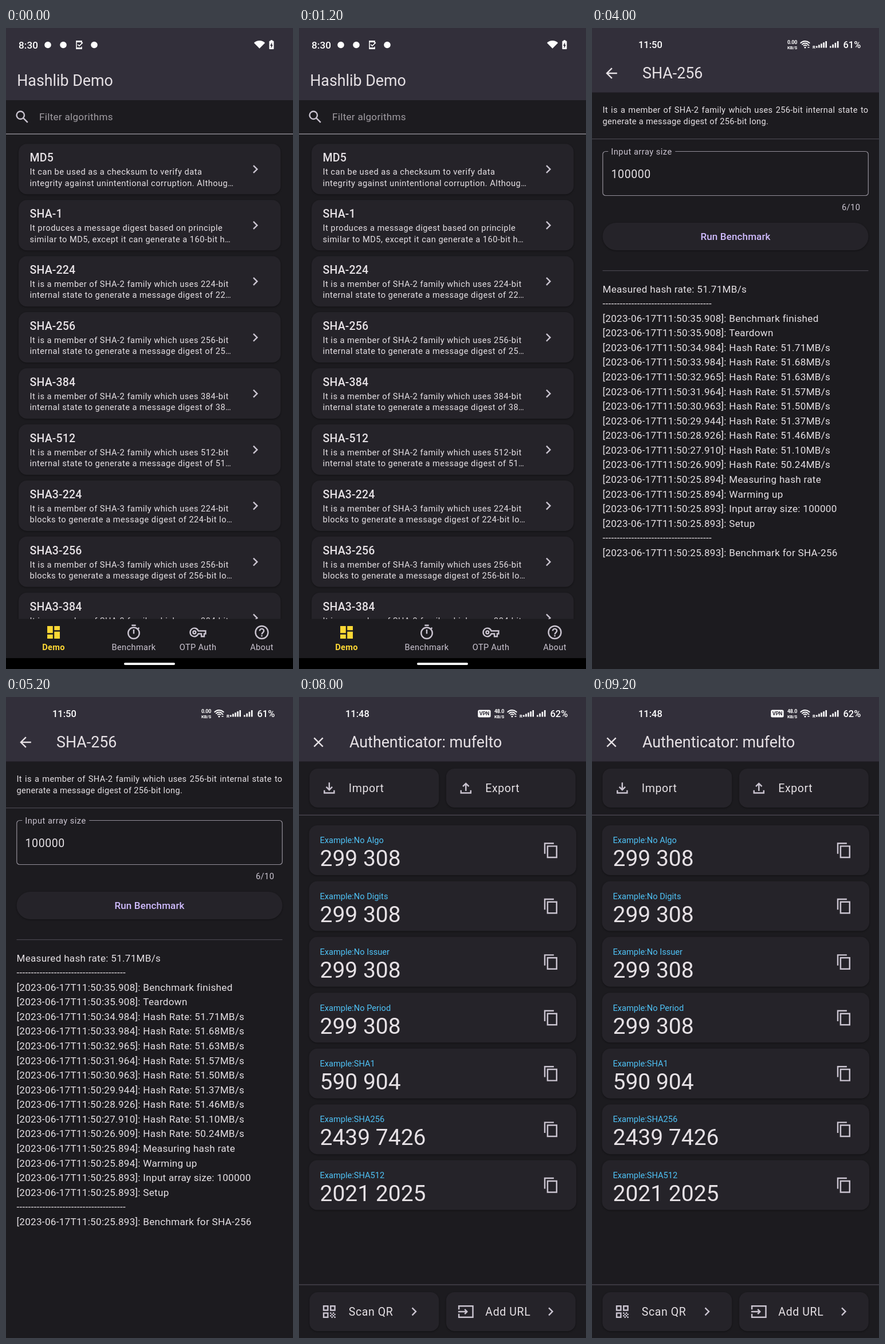
These frames come from a looping animation (501x1119 px, 10000 ms). An HTML page with a canvas:

```html
<!DOCTYPE html>
<html lang="en">
<head>
<meta charset="utf-8">
<title>Hashlib Demo</title>
<style>
html, body { margin: 0; width: 100%; height: 100%; overflow: hidden; background: #1c1b1f; }
canvas { display: block; width: 501px; height: 1119px; }
</style>
</head>
<body>
<canvas id="stage"></canvas>
<script>
const W = 501, H = 1119, DP = 1.219, SCENE_MS = 2000;
const canvas = document.getElementById('stage');
const ctx = canvas.getContext('2d');
const ratio = window.devicePixelRatio || 1;
canvas.width = W * ratio;
canvas.height = H * ratio;

const BG = '#1c1b1f', BAR = '#322f3a', CARD = '#252329', DIALOG = '#302d38';
const TEXT = '#e6e1e5', SOFT = '#cac4d0', OUTLINE = '#938f99', LINE = '#49454f';
const LILAC = '#d0bcff', CYAN = '#18ffff', YELLOW = '#fdd835', BLUE = '#4fc3f7', WHITE = '#fff';
const KEY_TEXT = '#f1e9e5';

// size in dp, letter spacing in dp, weight, family
const STYLES = {
  title: [22, 0, 400],
  dialog: [24, 0, 400],
  heading: [16, .15, 500],
  input: [16, .5, 400],
  choice: [16, 0, 400],
  body: [14, .25, 400],
  button: [14, .1, 500],
  small: [12, .4, 400],
  note: [12, .25, 400],
  tab: [12, .3, 400],
  tabOn: [12, .25, 700],
  plain: [12, 0, 400],
  code: [32, 0, 400],
  key: [28, 0, 400, 'Inter'],
  clock: [14, .1, 500],
  clockSmall: [13.5, 0, 500],
  tiny: [7.4, -.2, 700],
  tinier: [6.4, -.1, 700]
};

const FILLED = {
  chevron: 'M10 6L8.6 7.4 13.2 12l-4.6 4.6L10 18l6-6z',
  dashboard: 'M3 13h8V3H3zM3 21h8v-6H3zM13 21h8V11h-8zM13 3v6h8V3z',
  drop: 'M7 10l5 5 5-5z',
  wifi: 'M12 4C7.3 4 3.1 5.9 0 9l12 12L24 9C20.9 5.9 16.7 4 12 4z',
  battery: 'M15.7 4H14V2h-4v2H8.3Q7 4 7 5.3v15.4Q7 22 8.3 22h7.4q1.3 0 1.3-1.3V5.3Q17 4 15.7 4zM11 20v-5.5H9L13 7v5.5h2z',
  eye: 'M12 4.5C7 4.5 2.7 7.6 1 12c1.7 4.4 6 7.5 11 7.5s9.3-3.1 11-7.5c-1.7-4.4-6-7.5-11-7.5zM12 17a5 5 0 1 1 0-10a5 5 0 1 1 0 10zM12 9a3 3 0 1 0 0 6a3 3 0 1 0 0-6z'
};
const STROKED = {
  search: 'M15 9.5a5.5 5.5 0 1 1-11 0a5.5 5.5 0 1 1 11 0M13.5 13.5l6.3 6.3',
  timer: 'M9 2h6M12 8v6M17.7 7.3l2-2M20 13a8 8 0 1 1-16 0a8 8 0 1 1 16 0',
  vpnKey: 'M12.6 10H23v4h-2v4h-4v-4h-4.4a6 6 0 1 1 0-4zM9 12a2 2 0 1 1-4 0a2 2 0 1 1 4 0',
  help: 'M21 12a9 9 0 1 1-18 0a9 9 0 1 1 18 0M12 16v2M9 10a3 3 0 1 1 6 0c0 2.2-3 2.2-3 5',
  info: 'M21 12a9 9 0 1 1-18 0a9 9 0 1 1 18 0M12 7v2M12 11v6',
  back: 'M20 12H5.8M12.7 4.7L5.4 12l7.3 7.3',
  close: 'M5.7 5.7l12.6 12.6M18.3 5.7L5.7 18.3',
  copy: 'M3 17V2h13M7 6h13v16H7z',
  import: 'M5 15v4h14v-4M12 4v10M7.7 10.3L12 14.6l4.3-4.3',
  export: 'M5 15v4h14v-4M12 16V6M7.7 9.7L12 5.4l4.3 4.3',
  addUrl: 'M2 9V4h20v16H2v-5M1 12h12M10.3 8.7l3.3 3.3-3.3 3.3',
  login: 'M2 12h12M10.3 7.7l4.3 4.3-4.3 4.3M12 4h9v16h-9',
  scan: 'M4 4h6v6H4zM14 4h6v6h-6zM4 14h6v6H4zM13 14h2M17 14h2M15 16h2M19 16h2M13 18h2M17 18h2M15 20h2M19 20h2',
  backspace: 'M7 4h16v16H7L1.3 12zM10 8l8 8M18 8l-8 8',
  check: 'M4.1 12.7L9 17.6 20.3 6.3',
  down: 'M6 9l6 6 6-6',
  phoneCheck: 'M18 8V3H6v18h12v-5M6 5h12M6 19h12M9 11l3.5 3.5 8-8'
};
const paths = {};
for (const [name, d] of Object.entries({ ...FILLED, ...STROKED })) paths[name] = new Path2D(d);

function useStyle(style) {
  const [size, spacing, weight, family = 'Roboto'] = STYLES[style];
  ctx.font = `${weight} ${size * DP}px ${family}, sans-serif`;
  ctx.letterSpacing = `${spacing * DP}px`;
  return size * DP;
}

// y is the middle of the capitals
function text(str, x, y, style, color = TEXT, align = 'left') {
  const size = useStyle(style);
  ctx.textAlign = align;
  ctx.fillStyle = color;
  ctx.fillText(str, x, y + size * .3555);
}

function justified(lines, x, y, width, pitch) {
  lines.forEach((line, i) => {
    useStyle('note');
    if (i < lines.length - 1) {
      const gaps = line.split(' ').length - 1;
      ctx.wordSpacing = `${(width - ctx.measureText(line).width) / gaps}px`;
    }
    text(line, x, y + i * pitch, 'note');
    ctx.wordSpacing = '0px';
  });
}

function rect(x, y, w, h, color) {
  ctx.fillStyle = color;
  ctx.fillRect(x, y, w, h);
}

function round(x, y, w, h, r, color) {
  ctx.beginPath();
  ctx.roundRect(x, y, w, h, r);
  ctx.fillStyle = color;
  ctx.fill();
}

function dot(x, y, r, color = WHITE) {
  ctx.beginPath();
  ctx.arc(x, y, r, 0, Math.PI * 2);
  ctx.fillStyle = color;
  ctx.fill();
}

function card(x, y, w, h, r = 14.6) {
  ctx.save();
  ctx.shadowColor = 'rgba(0,0,0,.4)';
  ctx.shadowBlur = 3 * ratio;
  ctx.shadowOffsetY = ratio;
  round(x, y, w, h, r, CARD);
  ctx.restore();
}

function icon(name, x, y, color = SOFT, size = 29.3) {
  ctx.save();
  ctx.translate(x - size / 2, y - size / 2);
  ctx.scale(size / 24, size / 24);
  ctx.fillStyle = ctx.strokeStyle = color;
  ctx.lineWidth = 2;
  if (FILLED[name]) ctx.fill(paths[name], 'evenodd');
  else ctx.stroke(paths[name]);
  ctx.restore();
}

function field(x, y, w, h, label, active, bg = BG) {
  ctx.beginPath();
  ctx.roundRect(x, y, w, h, 5);
  ctx.strokeStyle = active ? LILAC : OUTLINE;
  ctx.lineWidth = active ? 2.44 : 1.22;
  ctx.stroke();
  useStyle('small');
  rect(x + 9.5, y - 3, ctx.measureText(label).width + 10.5, 6, bg);
  text(label, x + 14.5, y, 'small', active ? LILAC : SOFT);
}

function appBar(height, title, x, y, lead) {
  rect(0, 0, W, height, BAR);
  if (lead) icon(lead, 34, y + .5, TEXT);
  text(title, x, y, 'title');
}

function homePill(x, y, w, h) {
  round(x, y, w, h, h / 2, WHITE);
}

function systemNav() {
  rect(0, 1100, W, 19, '#000');
  homePill(206, 1108, 89, 4);
}

function power(y) {
  icon('wifi', 442.5, y - .5, WHITE, 19.2);
  icon('battery', 463.5, y, WHITE, 19.2);
}

function bars(x, count, step) {
  for (let i = 0; i < count; i++) {
    const h = 3 + i * 8.5 / (count - 1);
    rect(x + i * step, 34.5 - h, 2.6, h, WHITE);
  }
}

function carrierStatus(time, rate, level) {
  text(time, 81, 29.5, 'clockSmall', WHITE);
  text(rate, 349.5, 25, 'tiny', WHITE, 'center');
  text('KB/S', 349.5, 34, 'tinier', WHITE, 'center');
  ctx.strokeStyle = WHITE;
  ctx.lineWidth = 1.8;
  for (const r of [4, 7.5, 11]) {
    ctx.beginPath();
    ctx.arc(372, 34, r, -Math.PI * .77, -Math.PI * .23);
    ctx.stroke();
  }
  dot(372, 34, 1.5);
  rect(376.5, 29.5, 3, 1.5, WHITE);
  rect(376.5, 33, 3, 1.5, WHITE);
  text('R', 385, 33, 'tinier', WHITE);
  bars(391, 5, 4.1);
  bars(415, 4, 4.3);
  text(level, 438.5, 29.5, 'clockSmall', WHITE);
}

function gear(x, y) {
  ctx.strokeStyle = WHITE;
  ctx.lineWidth = 3.6;
  ctx.beginPath();
  ctx.arc(x, y, 4.6, 0, Math.PI * 2);
  for (let i = 0; i < 6; i++) {
    const a = i * Math.PI / 3 + Math.PI / 6;
    ctx.moveTo(x + 5 * Math.cos(a), y + 5 * Math.sin(a));
    ctx.lineTo(x + 7.8 * Math.cos(a), y + 7.8 * Math.sin(a));
  }
  ctx.stroke();
}

const sha2 = n => ['SHA-' + n, `It is a member of SHA-2 family which uses ${n}-bit`,
  `internal state to generate a message digest of ${String(n).slice(0, 2)}…`];
const sha3 = n => ['SHA3-' + n, `It is a member of SHA-3 family which uses ${n}-bit`,
  `blocks to generate a message digest of ${n}-bit lo…`];
const ALGORITHMS = [
  ['MD5', 'It can be used as a checksum to verify data', 'integrity against unintentional corruption. Althoug…'],
  ['SHA-1', 'It produces a message digest based on principle', 'similar to MD5, except it can generate a 160-bit h…'],
  ...[224, 256, 384, 512].map(sha2),
  ...[224, 256, 384].map(sha3)
];

function listScene() {
  appBar(126, 'Hashlib Demo', 19.2, 91.5);
  text('8:30', 22, 29.5, 'clock', WHITE);
  for (const x of [73, 100, 154]) dot(x, 29.5, 5.8);
  icon('phoneCheck', 127.5, 29.5, WHITE, 18);
  power(29);

  icon('search', 28.3, 155.3, SOFT);
  text('Filter algorithms', 58, 155, 'body', '#a19da3');
  rect(0, 184.3, W, 1.4, OUTLINE);

  ctx.save();
  ctx.beginPath();
  ctx.rect(0, 186, W, 845.7);
  ctx.clip();
  ALGORITHMS.forEach(([name, first, second], i) => {
    const y = 202.3 + i * 97.93;
    card(22, y, 457.5, 88);
    text(name, 41.5, y + 24, 'heading');
    text(first, 41.5, y + 48.6, 'small');
    text(second, 41.5, y + 68.1, 'small');
    icon('chevron', 435.2, y + 44.2);
  });
  ctx.restore();

  const tabs = [['dashboard', 'Demo', 83], ['timer', 'Benchmark', 223],
    ['vpnKey', 'OTP Auth', 335], ['help', 'About', 446.5]];
  tabs.forEach(([name, label, x], i) => {
    const color = i ? SOFT : YELLOW;
    icon(name, x, 1055, color);
    text(label, x, 1080.5, i ? 'tab' : 'tabOn', color, 'center');
  });
  systemNav();
}

function digestScene() {
  appBar(126, 'MD5', 87.5, 91.5, 'back');
  text('8:30', 22, 29.5, 'clock', WHITE);
  for (const x of [73, 100]) dot(x, 29.5, 5.8);
  rect(120, 22, 15, 14.5, WHITE);
  icon('phoneCheck', 154.5, 29.5, WHITE, 18);
  dot(181, 29.5, 2.2);
  power(29);

  justified([
    'It can be used as a checksum to verify data integrity against',
    'unintentional corruption. Although it was widely used as a',
    'cryptographic hash function once, it has been found to suffer from',
    'extensive vulnerabilities.'
  ], 18, 156.3, 466, 20.7);
  rect(0, 248.4, W, 1.2, LINE);

  field(18, 271, 466, 77.5, 'Input format');
  text('UTF-8', 32.5, 309, 'choice', CYAN);
  icon('drop', 455, 308.5);
  field(18, 362, 466, 106.3, 'Input text');
  text('Hashlib', 32.5, 401.5, 'input');
  text('7/1000', 469.5, 488.5, 'small', SOFT, 'right');
  rect(18, 516, 466, 1.2, LINE);

  field(18, 536.5, 466, 75.5, 'Output format', true);
  text('Base-16 / Hexadecimal', 32.5, 573, 'choice', CYAN);
  icon('drop', 455, 573);
  field(18, 626.3, 466, 114, 'Hash Digest');
  text('915a6fad2313d21d3fd421bdfc831369', 32.5, 660, 'input', YELLOW);
  icon('copy', 460, 716.5, SOFT, 23);
  text('32/32', 469.5, 760.5, 'small', SOFT, 'right');
  systemNav();
}

const rates = [
  ['34.984', '51.71'], ['33.984', '51.68'], ['32.965', '51.63'], ['31.964', '51.57'], ['30.963', '51.50'],
  ['29.944', '51.37'], ['28.926', '51.46'], ['27.910', '51.10'], ['26.909', '50.24']
];
const entry = (sec, msg) => `[2023-06-17T11:50:${sec}]: ${msg}`;
const RULE = '-'.repeat(38);
const LOG = [
  'Measured hash rate: 51.71MB/s', RULE,
  entry('35.908', 'Benchmark finished'),
  entry('35.908', 'Teardown'),
  ...rates.map(([sec, rate]) => entry(sec, `Hash Rate: ${rate}MB/s`)),
  entry('25.894', 'Measuring hash rate'),
  entry('25.894', 'Warming up'),
  entry('25.893', 'Input array size: 100000'),
  entry('25.893', 'Setup'), RULE,
  entry('25.893', 'Benchmark for SHA-256')
];

function benchmarkScene() {
  appBar(112.5, 'SHA-256', 88, 78.5, 'back');
  carrierStatus('11:50', '0.00', '61%');
  justified([
    'It is a member of SHA-2 family which uses 256-bit internal state to',
    'generate a message digest of 256-bit long.'
  ], 18.5, 142.3, 464, 20.8);
  rect(0, 193, W, 1.2, LINE);

  field(18.8, 215.5, 463.5, 77, 'Input array size');
  text('100000', 33.5, 255.3, 'input');
  text('6/10', 468.5, 313, 'small', SOFT, 'right');
  card(18.5, 340, 464, 48, 24);
  text('Run Benchmark', 250.5, 364.3, 'button', LILAC, 'center');
  rect(18.5, 423, 464, 1.2, LINE);

  LOG.forEach((line, i) => text(line, 18.5, 455.5 + i * 25.57, 'body'));
}

function passwordScene() {
  rect(0, 0, W, H, '#1c1a1c');
  appBar(124, 'Hashlib Authenticator', 19.2, 88.5);
  text('10:09', 21.5, 28, 'clock', WHITE);
  gear(82, 28);
  icon('info', 109, 28, WHITE, 18);
  icon('phoneCheck', 137, 28, WHITE, 18);
  power(28);

  round(48, 290, 406, 273, 34, DIALOG);
  text('Open Authenticator', 77.5, 338.2, 'dialog');
  field(78.5, 378.7, 345, 66.3, 'Password', true, DIALOG);
  rect(93, 396, 2.4, 29, LILAC);
  icon('eye', 395, 412, SOFT, 22.5);
  round(295, 480.3, 129, 48.7, 24.35, '#484548');
  icon('login', 329.5, 505, '#89858b');
  text('Enter', 353, 505, 'button', '#89858b');

  const keys = ['123', '456', '789', ',0.'];
  const sideColors = ['#494446', '#494446', '#fbe0ad', '#f9dcd8'];
  keys.forEach((row, r) => {
    const y = 739 + r * 77.9;
    [...row].forEach((char, c) => {
      const x = 4.3 + c * 124.6;
      round(x, y, 119, 71, 35.5, '#352f2c');
      text(char, x + 59.5, y + 35, 'key', KEY_TEXT, 'center');
    });
    round(378.1, y, 119.2, 71, 35.5, sideColors[r]);
  });
  rect(429, 774.5, 17, 2.4, KEY_TEXT);
  ctx.strokeStyle = KEY_TEXT;
  ctx.lineWidth = 2.6;
  ctx.beginPath();
  ctx.moveTo(426, 849.5);
  ctx.lineTo(426, 855.5);
  ctx.lineTo(450.5, 855.5);
  ctx.lineTo(450.5, 849.5);
  ctx.stroke();
  icon('backspace', 438, 931.5, '#241a08', 31.5);
  icon('check', 437.5, 1008, '#2b1614', 28);
  icon('down', 73.5, 1090, WHITE, 22);
  homePill(185, 1102.2, 132, 4.6);
}

const ACCOUNTS = [
  ['No Algo', '299 308'], ['No Digits', '299 308'], ['No Issuer', '299 308'], ['No Period', '299 308'],
  ['SHA1', '590 904'], ['SHA256', '2439 7426'], ['SHA512', '2021 2025']
];

function action(x, y, name, label, more) {
  card(x, y, 226, 68);
  icon(name, x + 34.5, y + 34);
  text(label, x + 68.5, y + 34, 'input');
  if (more) icon('chevron', x + 182.5, y + 33.8);
}

function codesScene() {
  appBar(112.5, 'Authenticator: mufelto', 88, 78.5, 'close');
  carrierStatus('11:48', '48.0', '62%');
  round(312.3, 22.5, 22.3, 13, 2.5, WHITE);
  text('VPN', 323.5, 29.2, 'tiny', BAR, 'center');

  action(18.3, 125, 'import', 'Import');
  action(256.8, 125, 'export', 'Export');
  rect(0, 205.5, W, 1.4, LINE);

  ACCOUNTS.forEach(([label, code], i) => {
    const y = 224 + i * 97.43;
    card(17.5, y, 466.5, 87);
    text('Example:' + label, 36.5, y + 26.1, 'plain', BLUE);
    text(code, 36.5, y + 57.45, 'code');
    icon('copy', 440, y + 43.7);
  });

  rect(0, 1025.3, W, 1.4, LINE);
  action(18.3, 1039, 'scan', 'Scan QR', true);
  action(256.8, 1039, 'addUrl', 'Add URL', true);
}

const scenes = [listScene, digestScene, benchmarkScene, passwordScene, codesScene];

function frame(now) {
  ctx.setTransform(ratio, 0, 0, ratio, 0, 0);
  rect(0, 0, W, H, BG);
  scenes[Math.floor(now / SCENE_MS) % scenes.length]();
  requestAnimationFrame(frame);
}
requestAnimationFrame(frame);
</script>
</body>
</html>
```
